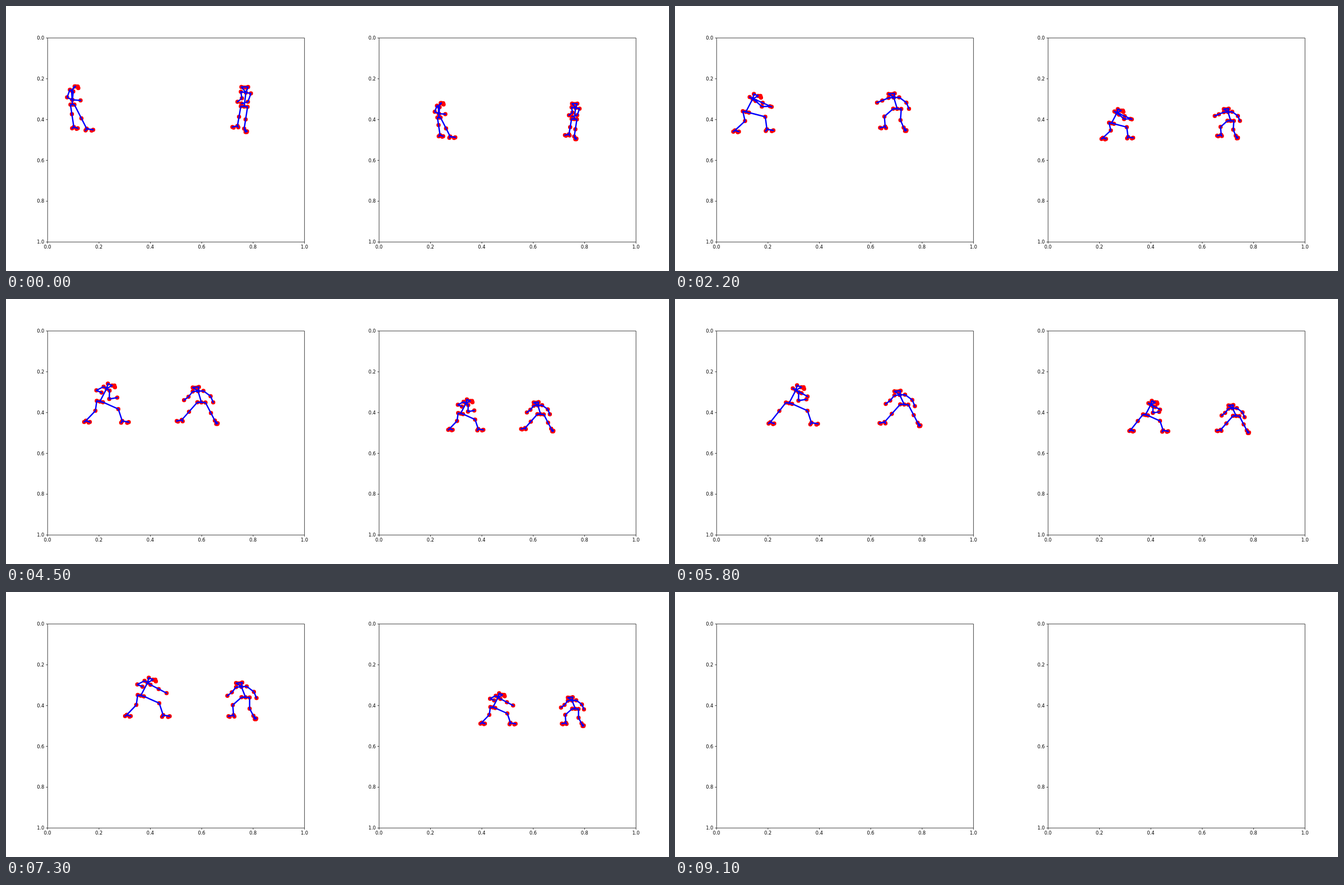
Animation, 1183 px wide and 473 px high, one loop 9.2 s. Source, as an HTML page:

```html
<!DOCTYPE html>
<html lang="en">
<head>
<meta charset="utf-8">
<title>Two skeletons, two views</title>
<style>
  html, body { margin: 0; width: 100%; height: 100%; overflow: hidden; background: #fff; }
  svg { display: block; width: 100vw; height: 100vh; }
  text { font: 8.22px "DejaVu Sans", sans-serif; fill: #000; }
  .axis { fill: none; stroke: #000; stroke-width: .75; }
  .dots { fill: none; stroke: #f00; stroke-width: 7.5; stroke-linecap: round; }
  .bones { fill: none; stroke: #00f; stroke-width: 2.46; stroke-linecap: square; stroke-linejoin: round; }
</style>
</head>
<body>
<svg viewBox="0 0 1183 473">
  <g id="axes"></g>
  <path id="dots" class="dots"/>
  <path id="bones" class="bones"/>
</svg>
<script>
const LOOP = 9200, STEP = 100, BLANK_AT = 9100;
const PLOT = { x: 74.24, y: 57.05, w: 458.4, h: 364.2, pitch: 591.5 };

const add = (a, b) => a.map((v, i) => v + b[i]);
const sub = (a, b) => a.map((v, i) => v - b[i]);
const mix = (a, b, k) => a.map((v, i) => v + (b[i] - v) * k);

// Stances: neck and feet are relative to the pelvis, hands and ear to the neck, brow to the ear.
// Shoulder and hip are half widths; flex scales the leg bones.
function makeLeft() {
  const standing = {
    neck: [-1.5, -25], ear: [5.5, -7.5], brow: [1.5, 0], shoulder: [3, 1.5], hip: [3.5, 0],
    footR: [2.5, 40], footL: [25.5, 43], handR: [1, 16.5], handL: [16, 17.5], flex: [.91]
  };
  const guard = {
    neck: [12, -23], ear: [2.3, -9], brow: [7.6, 3.4], shoulder: [5.3, 3.5], hip: [5.5, 1.2],
    footR: [-25, 34.3], footL: [40, 34.8], handR: [-9, 7], handL: [19, 16], flex: [1]
  };
  return {
    facing: 1,
    armR: [14.5, 10], armL: [15, 14.5], legR: [18, 24.5], legL: [30, 22.5],
    heelR: [-3, 2.3], toeR: [7, 2.3], heelL: [-2, 3], toeL: [11.5, 2],
    face: (ear, brow) => [add(brow, [4, .2]), add(brow, [5, 3])],
    keys: [
      { ...standing, time: 0, at: [118.5, 176] },
      { ...guard, time: 1500, at: [108, 187] },
      { ...guard, time: 2200, at: [126.5, 189], footR: [-19.5, 33], footL: [37.5, 31], handR: [34, 14], handL: [31, 13] },
      { ...guard, time: 3500, at: [143.5, 182.5], footL: [29.5, 32.5] },
      { ...guard, time: 4000, at: [144.5, 183] },
      { ...guard, time: 4500, at: [167.5, 183] },
      { ...guard, time: 5800, at: [203.5, 186], footR: [-33.5, 34], handR: [21, 11] },
      { ...guard, time: 7300, at: [240.5, 185], handL: [34, 18.5] },
      { ...standing, time: 9000, at: [176.5, 175] }
    ]
  };
}

function makeRight() {
  const standing = {
    neck: [3, -25], ear: [-8, -10], brow: [12, 0], shoulder: [9, 1.5], hip: [6, .5],
    footR: [-12, 34.5], footL: [0, 39.5], handR: [-15, 16.5], handL: [-8, 19.5], flex: [.91]
  };
  const guard = {
    neck: [-6, -20], ear: [-9.5, -6.6], brow: [11, -1], shoulder: [9.5, -.6], hip: [7.2, .2],
    footR: [-21.5, 31.7], footL: [24, 32.6], handR: [-25, 16], handL: [27, 20], flex: [1]
  };
  const wide = { ...guard, footR: [-35, 31.2] };
  return {
    facing: -1,
    armR: [12, 10], armL: [16, 12], legR: [21, 18], legL: [20, 14.5],
    heelR: [1.5, 2.5], toeR: [-9, 2], heelL: [2.5, 6], toeL: [5, 4.7],
    face: (ear, brow) => [.35, .7].map(k => add(mix(ear, brow, k), [0, 1])),
    keys: [
      { ...standing, time: 0, at: [425, 179.5] },
      { ...guard, time: 2200, at: [396.5, 183.5], footL: [11.5, 33.5], handR: [-30, 9] },
      { ...guard, time: 2450, at: [402, 183.5] },
      { ...guard, time: 3500, at: [324, 183.4], neck: [-5, -22.3], handR: [-22.5, 5] },
      { ...wide, time: 4500, at: [348.7, 184.5] },
      { ...wide, time: 5800, at: [409, 188.3], neck: [-8, -17] },
      { ...guard, time: 7300, at: [427.5, 188], neck: [-7.5, -18.8], footL: [14, 33] },
      { ...standing, time: 9000, at: [520, 179] }
    ]
  };
}

const walkers = [makeLeft(), makeRight()];

function stanceAt(keys, t) {
  const next = Math.max(1, keys.findIndex(key => key.time > t));
  const a = keys[t >= keys.at(-1).time ? keys.length - 2 : next - 1];
  const b = keys[keys.indexOf(a) + 1];
  const k = Math.min(1, (t - a.time) / (b.time - a.time));
  const stance = {};
  for (const part in a) if (part !== "time") stance[part] = mix(a[part], b[part], k);
  return stance;
}

// Two-bone inverse kinematics: the middle joint between root and tip.
function middleJoint(root, tip, [upper, lower], side) {
  const span = sub(tip, root), d = Math.hypot(...span);
  if (d >= upper + lower) return mix(root, tip, upper / (upper + lower));
  const along = (d * d + upper * upper - lower * lower) / (2 * d);
  const off = side * Math.sqrt(Math.max(0, upper * upper - along * along));
  const [ux, uy] = span.map(v => v / d);
  return add(root, [ux * along - uy * off, uy * along + ux * off]);
}

function skeleton(walker, t) {
  const s = stanceAt(walker.keys, t);
  const pelvis = s.at, neck = add(pelvis, s.neck);
  const ear = add(neck, s.ear), brow = add(ear, s.brow);
  const dots = [pelvis, neck, ear, brow, ...walker.face(ear, brow)];
  const bones = [[neck, ear, brow, neck], [neck, pelvis]];

  for (const side of ["R", "L"]) {
    const place = side === "R" ? sub : add;
    const shoulder = place(neck, s.shoulder), hand = add(neck, s["hand" + side]);
    const elbow = middleJoint(shoulder, hand, walker["arm" + side], walker.facing);

    const hip = place(pelvis, s.hip), ankle = add(pelvis, s["foot" + side]);
    const lengths = walker["leg" + side].map(v => v * s.flex[0]);
    const knee = middleJoint(hip, ankle, lengths, -walker.facing);
    const heel = add(ankle, walker["heel" + side]), toe = add(ankle, walker["toe" + side]);
    const smallToe = add(mix(toe, heel, .2), [0, 1]);

    dots.push(shoulder, elbow, hand, hip, knee, ankle, heel, toe, smallToe);
    bones.push([neck, shoulder, elbow, hand], [pelvis, hip, knee, ankle, toe], [ankle, heel]);
  }
  return { dots, bones };
}

const views = [
  p => p,
  ([x, y]) => [679.2 + x * .7876, 184 + (y - 157) * .79]
];
const write = p => p.map(v => v.toFixed(2)).join(" ");

function draw(t) {
  let dots = "", bones = "";
  if (t < BLANK_AT) {
    for (const walker of walkers) {
      const body = skeleton(walker, t);
      for (const view of views) {
        dots += body.dots.map(p => `M${write(view(p))}h.01`).join("");
        bones += body.bones.map(line => "M" + line.map(p => write(view(p))).join("L")).join("");
      }
    }
  }
  document.getElementById("dots").setAttribute("d", dots);
  document.getElementById("bones").setAttribute("d", bones);
}

function axes(x0) {
  const { y, w, h } = PLOT, bottom = y + h;
  let ticks = "", labels = "";
  for (let i = 0; i <= 5; i++) {
    const tx = x0 + w * i / 5, ty = y + h * i / 5, name = (i / 5).toFixed(1);
    ticks += `M${tx} ${bottom}v2.9M${x0} ${ty}h-2.9`;
    labels += `<text x="${tx - .2}" y="${bottom + 12}" text-anchor="middle">${name}</text>` +
      `<text x="${x0 - 6}" y="${ty + 3}" text-anchor="end">${name}</text>`;
  }
  return `<path class="axis" d="M${x0} ${y}h${w}v${h}h${-w}z${ticks}"/>${labels}`;
}

document.getElementById("axes").innerHTML = axes(PLOT.x) + axes(PLOT.x + PLOT.pitch);

const start = performance.now();
function tick() {
  const t = (performance.now() - start) % LOOP;
  draw(Math.floor(t / STEP) * STEP);
  requestAnimationFrame(tick);
}
tick();
</script>
</body>
</html>
```
